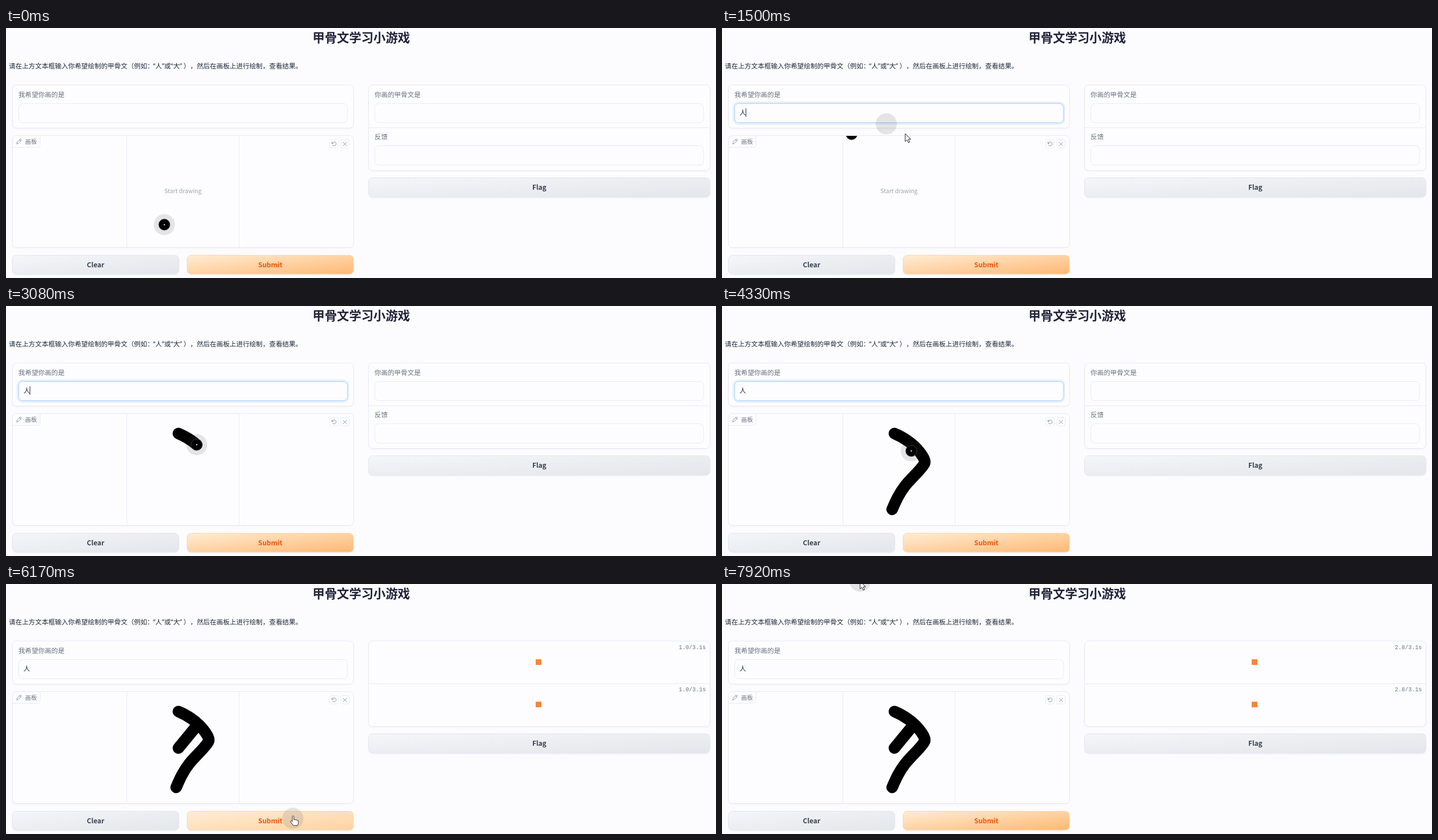
These frames come from a looping animation (1260x445 px, 8 s). An HTML page:

```html
<!DOCTYPE html>
<html lang="zh-CN">
<head>
<meta charset="utf-8">
<title>甲骨文学习小游戏</title>
<style>
html, body { margin: 0; width: 100%; height: 100%; overflow: hidden; background: #fcfcff; }
svg { display: block; }
text { font: 11.7px "Noto Sans CJK SC", "Noto Sans CJK", sans-serif; fill: #6b7280; text-spacing-trim: space-all; }
.title { font-size: 21.6px; font-weight: 700; fill: #1f2237; }
.body { fill: #1f2937; }
.quote { font-family: "Open Sans", "Noto Sans CJK SC", sans-serif; }
.small { font-size: 10.4px; }
.hint { font-size: 10.5px; fill: #9ca3af; }
.btn { font-size: 12px; font-weight: 700; fill: #374151; }
.timer { font: 10px "Liberation Mono", monospace; }
.mid { text-anchor: middle; }
.end { text-anchor: end; }
.box { fill: #fdfdff; stroke: #e8e9f8; }
.panel { filter: drop-shadow(0 1px 1px rgba(0, 0, 0, .05)); }
.line { fill: none; stroke: #e8e9f8; }
.icon { fill: none; stroke: #6b7280; stroke-width: .75; stroke-linecap: round; stroke-linejoin: round; }
.ink { fill: none; stroke: #000; stroke-width: 20.5; stroke-linecap: round; stroke-linejoin: round; }
.pointer { fill: #fff; stroke: #222; stroke-width: 1; stroke-linejoin: round; }
</style>
</head>
<body>
<svg id="stage" width="1260" height="445" viewBox="0 0 1260 445">
  <defs>
    <linearGradient id="gray" x2="1" y2="1"><stop stop-color="#f5f5fa"/><stop offset="1" stop-color="#e3e6ea"/></linearGradient>
    <linearGradient id="orange" x2="1" y2="1"><stop stop-color="#ffedd5"/><stop offset="1" stop-color="#fdb873"/></linearGradient>
    <linearGradient id="hover" x2="1" y2="1"><stop stop-color="#ffedd5"/><stop offset="1" stop-color="#fdd3a2"/></linearGradient>
    <clipPath id="board"><rect x="12" y="192" width="604" height="198.500" rx="6"/></clipPath>
  </defs>

  <text class="title mid" x="630.500" y="25">甲骨文学习小游戏</text>
  <text class="body" x="5" y="71.500">请在上方文本框输入你希望绘制的甲骨文（例如：</text>
  <text class="body quote" x="261" y="71.500">“人”或“大”</text>
  <text class="body" x="315" y="71.500">），然后在画板上进行绘制，查看结果。</text>

  <rect class="box panel" x="11.500" y="101.500" width="605" height="76.500" rx="7"/>
  <text x="22" y="122.500">我希望你画的是</text>
  <rect id="ring" x="20.500" y="132.500" width="587" height="38" rx="9" fill="none" stroke="#e3effd" stroke-width="3"/>
  <rect id="field" class="box" x="22.500" y="134.500" width="583.500" height="34" rx="7"/>
  <text id="typed" class="body" x="31" y="155.300"></text>
  <path id="caret" stroke="#1f2937"/>

  <rect class="box panel" x="11.500" y="191.500" width="605" height="199" rx="7"/>
  <path class="line" d="M214.500 192V390M413.500 192V390M12 212.500H54.500Q60.500 212.500 60.500 206.500V192"/>
  <path class="icon" d="M19 206l.8-3 5-5q1.200-.6 2 .2t.2 2l-5 5zM23.800 199l2.200 2.200"/>
  <text class="small" x="34" y="205.800">画板</text>
  <text id="hint" class="hint mid" x="314" y="294.300">Start drawing</text>
  <rect class="box" x="574.500" y="198.500" width="15" height="15" rx="3"/>
  <rect class="box" x="594" y="198.500" width="15" height="15" rx="3"/>
  <path class="icon" d="M578.500 203v2.600h2.600M578.800 205.300a3.600 3.600 0 1 1 .5 3M598.500 203.500l6 6M604.500 203.500l-6 6"/>
  <path id="main" class="ink" d="M306 227C323 234 340 246 350 259C357 268 362 276 359 281C352 293 336 306 325 320C314 334 308 348 302 362"/>
  <path id="branch" class="ink" d="M338 253L306 292"/>

  <rect class="panel" x="11.500" y="404.500" width="295" height="33.500" rx="7" fill="url(#gray)" stroke="#e4e6ee"/>
  <text class="btn mid" x="159" y="425.700">Clear</text>
  <rect id="submit" class="panel" x="321.500" y="404.500" width="295" height="33.500" rx="7" stroke="#fed7aa"/>
  <text class="btn mid" x="469" y="425.700" style="fill:#ea580c">Submit</text>

  <rect class="box panel" x="643.500" y="101.500" width="605.500" height="152" rx="7"/>
  <path class="line" d="M644 177.500H1249"/>
  <g id="fields">
    <text x="654" y="122.500">你画的甲骨文是</text>
    <rect class="box" x="654.500" y="134.500" width="583.500" height="34" rx="7"/>
    <text x="654" y="198.300">反馈</text>
    <rect class="box" x="654.500" y="209.500" width="583.500" height="34.500" rx="7"/>
  </g>
  <g id="loading">
    <rect x="940" y="134" width="10" height="10" fill="#f9843a"/>
    <rect x="940" y="209.500" width="10" height="10" fill="#f9843a"/>
    <text class="timer end" x="1242" y="115.800"></text>
    <text class="timer end" x="1242" y="191.300"></text>
  </g>
  <rect class="panel" x="643.500" y="266.500" width="605.500" height="34.500" rx="7" fill="url(#gray)" stroke="#e4e6ee"/>
  <text class="btn mid" x="946.500" y="287.700">Flag</text>

  <circle id="halo" r="18.800" fill="#404048" fill-opacity=".13"/>
  <g clip-path="url(#board)">
    <g id="brush"><circle r="10" stroke="#4a493a" stroke-width=".8"/><circle r="1.300" fill="#c9c9c9"/></g>
  </g>
  <g id="mouse" class="pointer">
    <path id="arrow" d="M0 0V14L3.300 11L5.700 16L8 15L5.700 10H10Z"/>
    <path id="hand" transform="scale(.94)" d="M-2 9V1.500Q-2-.3-.5-.3T1 1.500V7Q3.500 5.500 4 7.500Q6.300 6.300 6.800 8.300Q9.300 7.500 9.300 10V13Q9 16 7.500 18H0L-5 11.500Q-5.500 9-3.500 9L-2 10.500Z"/>
    <path id="beam" d="M-2-6H2M0-6V6M-2 6H2"/>
  </g>
</svg>
<script>
const $ = id => document.getElementById(id);
const LOOP = 8000, STEP = 250 / 3;
const FOCUS = 660, COMPOSE = 1000, COMMIT = 1410, DRAW = 2660, BLUR = 5000, RUN = 5150;

// [time, x, y] of the cursor; strokes take over where the pen is down
const track = [
  [167, 281, 350], [333, 256, 270], [500, 231, 196], [583, 229, 166], [667, 228, 158],
  [1333, 228, 158], [1417, 256, 161], [1500, 291.500, 170.500], [1583, 325, 188], [1667, 345, 212],
  [1833, 355, 236], [2083, 308, 229], [2167, 306, 227], [3833, 302, 362], [4000, 322, 305],
  [4083, 322, 305], [4250, 336, 258], [4333, 338, 252.500], [4667, 306, 292], [4750, 390, 372],
  [4833, 455, 428], [4917, 495, 426], [5000, 502, 419], [5750, 502, 419], [6167, 509, 417],
  [6250, 510, 413], [6333, 440, 300], [6417, 330, 130], [6500, 265, 20], [6583, 245, -5]
];
const strokes = [
  { el: $('main'), steps: [[2667, 0], [3083, .265], [3417, .6], [3833, 1]] },
  { el: $('branch'), steps: [[4333, 0], [4667, 1]] }
];
for (const s of strokes) s.length = s.el.getTotalLength();

function sample(table, t) {
  const i = table.findIndex(row => row[0] > t);
  if (i === 0) return table[0].slice(1);
  if (i < 0) return table[table.length - 1].slice(1);
  const a = table[i - 1], b = table[i];
  const k = (t - a[0]) / (b[0] - a[0]);
  return a.slice(1).map((v, n) => v + (b[n + 1] - v) * k);
}

function cursorAt(t) {
  for (const s of strokes) {
    if (t >= s.steps[0][0] && t <= s.steps[s.steps.length - 1][0]) {
      const p = s.el.getPointAtLength(sample(s.steps, t)[0] * s.length);
      return [p.x, p.y];
    }
  }
  return sample(track, t);
}

const show = (el, on) => el.style.display = on ? '' : 'none';
const place = (el, [x, y]) => el.setAttribute('transform', `translate(${x} ${y})`);
const inside = ([x, y], l, t, r, b) => x > l && x < r && y > t && y < b;
const onBoard = p => inside(p, 12, 192, 616, 390);

function caretOn(t) {
  if (t < FOCUS || t >= BLUR) return false;
  return !(t >= 1910 && t < 2410) && !(t >= 3910 && t < 4410);
}

function draw(t) {
  const focused = t >= FOCUS && t < BLUR;
  show($('ring'), focused);
  $('field').style.stroke = focused ? '#a9d0fb' : '';

  const composing = t >= COMPOSE && t < COMMIT;
  $('typed').textContent = t < COMPOSE ? '' : composing ? 'ren' : '人';
  $('typed').style.textDecoration = composing ? 'underline' : '';
  const caretX = t < COMPOSE ? 31.5 : composing ? 49.5 : 42.5;
  $('caret').setAttribute('d', `M${caretX} 143V158`);
  show($('caret'), caretOn(t));

  show($('hint'), t < DRAW);
  for (const s of strokes) {
    const done = sample(s.steps, t)[0] * s.length;
    show(s.el, t >= s.steps[0][0]);
    s.el.style.strokeDasharray = `${done} 999`;
  }

  // the highlight trails the pointer by one step
  const halo = cursorAt(t), tip = cursorAt(t + STEP);
  place($('halo'), halo);
  place($('mouse'), tip);
  const parked = t < 2000 && !onBoard(halo);
  place($('brush'), parked ? [230, 189] : halo);
  show($('brush'), parked || onBoard(halo));

  const onField = inside(tip, 22, 134, 606, 169);
  const onSubmit = inside(tip, 321, 404, 617, 439);
  show($('beam'), onField);
  show($('hand'), onSubmit);
  show($('arrow'), !onField && !onSubmit && !onBoard(tip));
  $('submit').setAttribute('fill', `url(#${onSubmit ? 'hover' : 'orange'})`);

  const running = t >= RUN;
  show($('fields'), !running);
  show($('loading'), running);
  const clock = `${(Math.max(0, t - RUN) / 1000).toFixed(1)}/3.1s`;
  for (const el of document.querySelectorAll('.timer')) el.textContent = clock;
}

const start = performance.now();
function tick() {
  const t = (performance.now() - start) % LOOP;
  draw(Math.floor((t + .5) / STEP) * STEP);
  requestAnimationFrame(tick);
}
tick();
</script>
</body>
</html>
```
